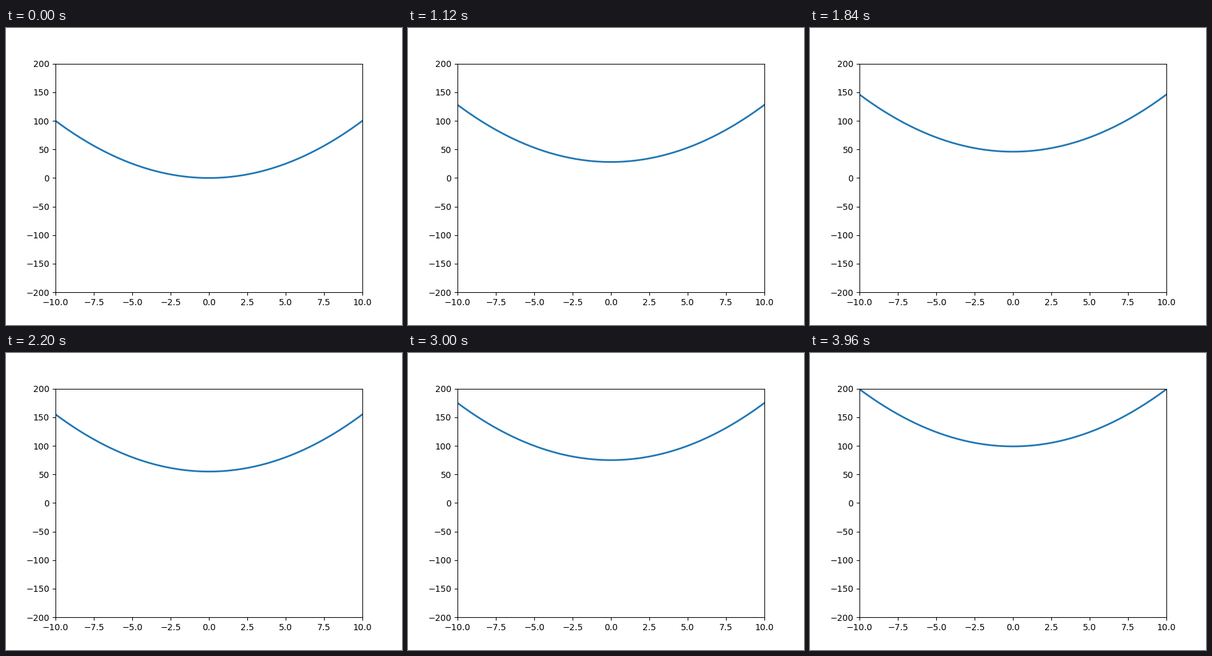
Recreate the animation shown at these times as a matplotlib script. Size 640 by 480 pixels, loop 4 s.

```python
import numpy as np
import matplotlib.pyplot as plt
from matplotlib.animation import FuncAnimation

FRAMES = 100
INTERVAL = 40

fig, ax = plt.subplots(figsize=(6.4, 4.8), dpi=100)
ax.set_xlim(-10, 10)
ax.set_ylim(-200, 200)

x = np.linspace(-10, 10, 200)
line, = ax.plot(x, x**2, color="#1f77b4", lw=2)


def update(i):
    # The parabola rises by one unit per frame.
    line.set_ydata(x**2 + i)
    return line,


def init():
    return update(0)


anim = FuncAnimation(fig, update, frames=FRAMES, init_func=init,
                     interval=INTERVAL, repeat=True, repeat_delay=0, blit=False)

plt.show()
```
